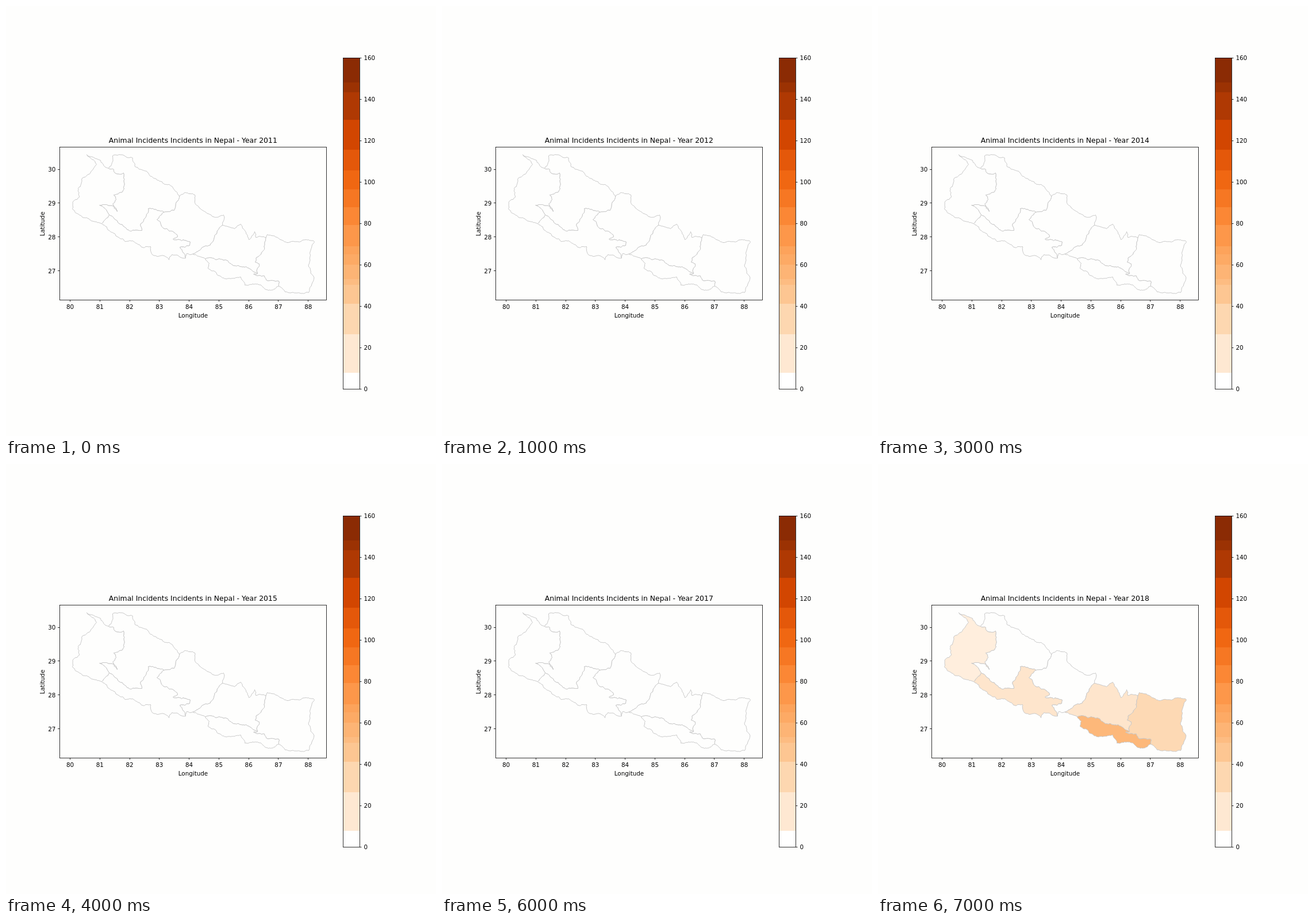
These frames come from a looping animation (748x748 px, 8 s). An HTML page:

```html
<!DOCTYPE html>
<html lang="en">
<head>
<meta charset="utf-8">
<title>Yearly incident map</title>
<style>
  html, body { margin: 0; width: 100%; height: 100%; overflow: hidden; background: #fefefd; }
  svg { display: block; width: 748px; height: 748px; }
  text { font-family: "DejaVu Sans", sans-serif; font-size: 10.35px; fill: #000; }
  #title { font-size: 12.42px; }
  #map path { stroke: #c9c9c9; stroke-width: 1; stroke-linejoin: round; }
  .line { fill: none; stroke: #000; stroke-width: 0.8; }
</style>
</head>
<body>
<svg viewBox="0 0 748 748">
  <g id="map" transform="translate(0.5 0.5)"></g>
  <g id="bar" shape-rendering="crispEdges"></g>
  <g id="axes">
    <rect class="line" x="93.5" y="245.5" width="464" height="266"/>
    <rect class="line" x="586.5" y="90.5" width="29" height="576"/>
    <text id="title" x="325.3" y="238" text-anchor="middle"></text>
    <text x="325.5" y="541.8" text-anchor="middle">Longitude</text>
    <text transform="translate(67.2 379) rotate(-90)" text-anchor="middle">Latitude</text>
  </g>
</svg>
<script>
const $ = id => document.getElementById(id);

function add(parent, tag, attrs, text) {
  const el = document.createElementNS(parent.namespaceURI, tag);
  for (const k in attrs) el.setAttribute(k, attrs[k]);
  if (text !== undefined) el.textContent = text;
  return parent.appendChild(el);
}

let seed = 11;
const random = () => (seed = seed * 16807 % 2147483647) / 2147483647;

// Orange scale, t from 0 to 1.
const stops = ["fff5eb", "fee6ce", "fdd0a2", "fdae6b", "fd8d3c", "f16913", "d94801", "a63603", "7f2704"];
function ramp(t) {
  const pos = t * 8, i = Math.min(7, Math.floor(pos));
  const part = (s, c) => parseInt(s.substr(c * 2, 2), 16);
  const mix = c => Math.round(part(stops[i], c) + (part(stops[i + 1], c) - part(stops[i], c)) * (pos - i));
  return `rgb(${mix(0)},${mix(1)},${mix(2)})`;
}

// Splits a stretch at a shifted midpoint until it is as rough as a coastline.
function rough([x, y], [u, v]) {
  const dx = u - x, dy = v - y, len = Math.hypot(dx, dy);
  if (len < 3.5) return [[u, v]];
  const shift = (random() - 0.5) * Math.min(0.36, 4 / len);
  const mid = [(x + u) / 2 - dy * shift, (y + v) / 2 + dx * shift];
  return [...rough([x, y], mid), ...rough(mid, [u, v])];
}

function border(keys) {
  const pts = keys.split(" ").map(p => p.split(",").map(Number));
  return pts.flatMap((p, i) => i ? rough(pts[i - 1], p) : [p]);
}

// Key points between junctions; neighbouring provinces share a border.
const farWest = border("178,282 168,274 164,268 140,258 157,275 150,285 132,299 125,317 127,332 118,338 115,352 138,368 166,378");
const westInner = border("178,282 187,284 189,290 204,290 205,312 202,323 187,328 191,336 185,344 193,357 187,348 162,346 172,352 179,363");
const westFoot = border("179,363 166,378");
const midWest = border("179,363 215,391 236,390 234,378 242,368 247,352 275,358");
const northWest = border("178,282 184,272 185,260 196,258 220,264 224,279 240,286 253,296 282,310 301,333");
const midNorth = border("301,333 292,355 275,358");
const north = border("301,333 311,324 328,328 331,346 345,357 363,367 378,363 376,381");
const midSouth = border("275,358 262,371 273,386 294,395 298,401 290,405 320,410 319,416 302,419 312,438");
const southWest = border("166,378 181,392 209,409 223,410 240,420 251,418 254,432 278,436 283,441 288,432 312,438");
const gap = border("312,438 314,430 324,431");
const central = border("376,381 366,396 358,411 340,420 324,431");
const foot = border("324,431 346,439");
const northMid = border("376,381 397,387 408,379 422,406 432,392 434,402 452,402");
const eastInner = border("452,402 449,423 435,437 433,445 440,448 437,465");
const plainTop = border("346,439 374,440 400,452 417,453 437,465");
const plainEast = border("437,465 430,466 449,469 452,476 474,478 474,487");
const plainFoot = border("346,439 353,447 351,456 380,474 408,471 415,485 433,483 460,494 474,487");
const east = border("452,402 454,397 473,403 488,411 510,410 522,406 536,410 528,430 526,453 535,475 526,498 490,498 474,487");

const back = pts => [...pts].reverse();

function province(tint, ...borders) {
  const d = "M" + borders.flat().map(p => p.map(c => c.toFixed(1)).join(" ")).join("L") + "Z";
  return { el: add($("map"), "path", { d }), tint };
}

const blank = "#fefefd";
const provinces = [
  province(blank, back(northWest), westInner, midWest, back(midNorth)),
  province(blank, north, central, back(gap), back(midSouth), back(midNorth)),
  province(ramp(0.06), farWest, back(westFoot), back(westInner)),
  province(ramp(0.13), westFoot, southWest, back(midSouth), back(midWest)),
  province(ramp(0.13), northMid, eastInner, back(plainTop), back(foot), back(central)),
  province(ramp(0.2), east, back(plainEast), back(eastInner)),
  province(ramp(0.34), plainFoot, back(plainEast), back(plainTop))
];

// Colour bar: each band takes the scale's colour at its middle, the lowest is white.
const edges = [90, 133, 150, 198, 250, 286, 319, 350, 381, 418, 432, 450, 475, 485, 518, 571, 638, 666];
edges.slice(1).forEach((end, i) => {
  const y = edges[i], t = (666 - (y + end) / 2) / 576;
  add($("bar"), "rect", { x: 587, y, width: 28, height: end - y, fill: end === 666 ? "#fff" : ramp(t) });
});

function tick(d, x, y, anchor, label) {
  add($("axes"), "path", { class: "line", d });
  add($("axes"), "text", { x, y, "text-anchor": anchor }, label);
}

for (let i = 0; i <= 8; i++) {
  const x = 111.5 + i * 51.78, y = 666 - i * 72;
  tick(`M${Math.floor(x) + 0.5} 511v3.5`, x, 526.8, "middle", 80 + i);
  tick(`M615 ${y + 0.5}h3.5`, 622.4, y + 4, "start", i * 20);
}
for (let i = 0; i < 4; i++) {
  const y = 284 + i * 58.9;
  tick(`M90 ${Math.floor(y) + 0.5}h3.5`, 86.3, y + 4, "end", 30 - i);
}

let shown = -1;

function show(step) {
  $("title").textContent = `Animal Incidents Incidents in Nepal - Year ${2011 + step}`;
  for (const p of provinces) p.el.setAttribute("fill", step === 7 ? p.tint : blank);
  shown = step;
}

const start = performance.now();

function frame() {
  const step = Math.floor((performance.now() - start) % 8000 / 1000);
  if (step !== shown) show(step);
  requestAnimationFrame(frame);
}
frame();
</script>
</body>
</html>
```
